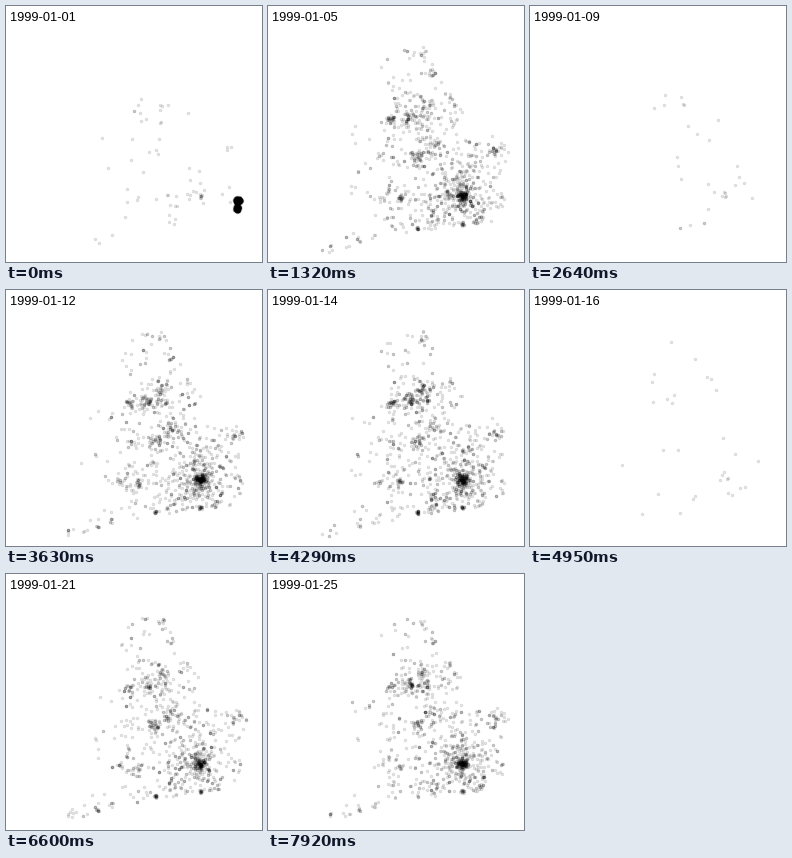
A matplotlib script for the animation above (8000 ms loop, 256 px wide and 256 px high).

```python
import numpy as np
import matplotlib.pyplot as plt
from matplotlib.animation import FuncAnimation
from matplotlib.path import Path

SIZE, DPI = 256, 64
PX = 72 / DPI              # points per pixel
STEP, LOOP, HOLD = 20, 8000, 330
DAYS = 25

# x, y, spread, weight of the main towns
TOWNS = np.array([
    (194, 190, 3.2, 190), (193, 189, 13, 230), (148, 150, 3.5, 46),
    (140, 110, 4, 60), (122, 113, 2, 26), (154, 98, 4, 36),
    (158, 112, 4, 22), (155, 48, 2.5, 14), (163, 66, 2.5, 6),
    (132, 192, 2, 22), (115, 190, 4, 18), (91, 235, 1.5, 8),
    (105, 231, 2.5, 9), (164, 214, 4, 20), (149, 222, 1, 16),
    (194, 217, 1, 20), (210, 216, 4, 14), (228, 142, 3.5, 12),
    (200, 160, 9, 30), (165, 137, 6, 40), (64, 242, 4, 7),
])

# rough outline of the land
COAST = Path([
    (118, 92), (112, 62), (124, 48), (155, 42), (168, 68), (193, 106),
    (182, 125), (206, 140), (222, 128), (240, 144), (228, 172), (237, 195),
    (226, 213), (165, 221), (112, 229), (86, 238), (54, 245), (100, 211),
    (126, 199), (98, 192), (70, 180), (92, 150), (82, 120), (118, 115),
])


def on_land(pts, margin=4):
    return (COAST.contains_points(pts, radius=margin)
            | COAST.contains_points(pts, radius=-margin))


def make_sites(rng):
    """Fixed places, some of them busier than others."""
    town = np.repeat(TOWNS, (TOWNS[:, 3] * 3).astype(int), axis=0)
    near = town[:, :2] + rng.normal(size=(len(town), 2)) * town[:, 2:3]
    far = rng.uniform((50, 40), (242, 248), (4600, 2))
    sparse = np.where(far[:, 0] < 118, 0.35, 1) * np.where(far[:, 1] < 85, 0.35, 1)
    far = far[rng.random(len(far)) < sparse]
    pts = np.vstack([near, far])
    pts = pts[on_land(pts)]
    weight = rng.gamma(0.8, 1, len(pts))
    return pts, weight / weight.sum()


def lobe(rng, x, y, rx, ry, n):
    """Heap of points, dense inside and thin at the rim."""
    a = rng.uniform(0, 2 * np.pi, n)
    r = rng.beta(2, 1.4, n)
    return np.c_[x + rx * r * np.cos(a), y + ry * r * np.sin(a)]


def make_day(day):
    rng = np.random.default_rng(1999 + day)
    if day == 0:
        n = 68
    elif day % 7 in (1, 2):        # Saturday, Sunday
        n = rng.integers(26, 40)
    else:
        n = rng.integers(950, 1350)
    pts = sites[rng.choice(len(sites), n, p=weights)]
    if day == 0:
        pts = np.vstack([pts, lobe(rng, 231.5, 194, 4.2, 3.6, 360),
                         lobe(rng, 230.6, 201.5, 3.2, 4, 320)])
    return pts + 0.5


sites, weights = make_sites(np.random.default_rng(7))
days = [make_day(d) for d in range(DAYS)]

fig = plt.figure(figsize=(SIZE / DPI, SIZE / DPI), dpi=DPI, facecolor="white")
ax = fig.add_axes([0, 0, 1, 1])
ax.set(xlim=(0, SIZE), ylim=(SIZE, 0))
ax.axis("off")
ink = (0, 0, 0, 0.1)
dots, = ax.plot([], [], "o", ms=2.7 * PX, mew=0.8 * PX, mfc=ink, mec=ink)
date = ax.text(4, 15, "", family="Liberation Sans", size=12.7 * PX,
               color="black", va="baseline")


def update(i):
    day = min((i * STEP + STEP // 2) // HOLD, DAYS - 1)
    dots.set_data(days[day].T)
    date.set_text(f"1999-01-{day + 1:02d}")
    return dots, date


anim = FuncAnimation(fig, update, frames=LOOP // STEP, interval=STEP,
                     repeat=True, repeat_delay=0)
plt.show()
```
